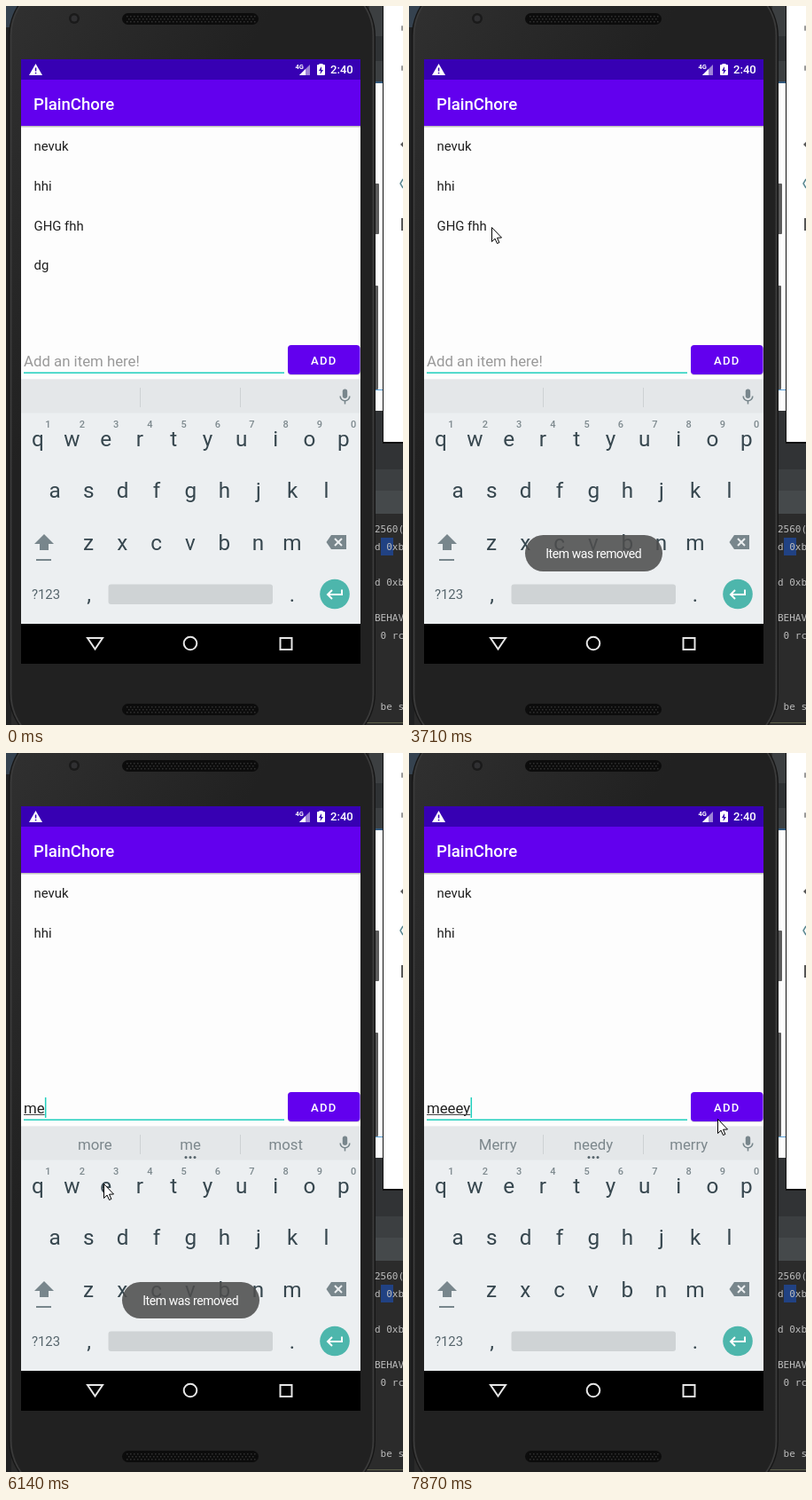
An HTML page with a canvas that plays this animation: 448x810 px, repeating every 7990 ms.

```html
<!DOCTYPE html>
<html lang="en">
<head>
<meta charset="utf-8">
<title>Todo app demo</title>
<style>
html, body { margin: 0; width: 100%; height: 100%; overflow: hidden; background: #2b2b2b; }
canvas { display: block; width: 448px; height: 810px; }
#toast {
  position: absolute; left: 130.5px; top: 595.5px; width: 155.5px; height: 41px;
  border-radius: 20.5px; background: rgba(78, 78, 78, .87); color: #fff; opacity: 0;
  font: 14px/42px Roboto, sans-serif; letter-spacing: -.4px; text-align: center; white-space: nowrap;
}
</style>
</head>
<body>
<canvas id="stage" width="448" height="810"></canvas>
<div id="toast">Item was removed</div>
<script>
const ctx = document.getElementById('stage').getContext('2d');
const toast = document.getElementById('toast');
const LOOP = 7990;
const PURPLE = '#6200ee', DARK_PURPLE = '#3700b3', ACCENT = '#1fcfbd', ICON = '#78868c', KEY = '#37474f';

const items = ['nevuk', 'hhi', 'GHG fhh', 'dg'];
const removals = [2670, 3980];
const word = 'meeey';
const presses = [5270, 6020, 6390, 6680, 7320];
const suggestions = ['', 'more me most', 'me new met', 'me new meet', 'me new meet', 'Merry needy merry'];

// Pointer journeys, each continuing from where the last one ended.
const home = { x: 177, y: 527, end: 250 };
const moves = [
  { start: 300, end: 790, x: 328, y: 597 },
  { start: 930, end: 1190, x: 92, y: 316 },
  { start: 1190, end: 1340, x: 90, y: 300 },
  { start: 1600, end: 1730, x: 87, y: 290 },
  { start: 2850, end: 3190, x: 93, y: 249 },
  { start: 4100, end: 4970, x: 318, y: 603 },
  { start: 5150, end: 5510, x: 110, y: 485 },
  { start: 6530, end: 6680, x: 160, y: 501 },
  { start: 6800, end: 7180, x: 235, y: 499 },
  { start: 7320, end: 7870, x: 348, y: 412 }
];

const clamp = v => Math.max(0, Math.min(1, v));
const ease = v => v * v * (3 - 2 * v);
const passed = (times, t) => times.filter(time => t >= time).length;

function pointerAt(t) {
  let { x, y } = home;
  for (const m of moves) {
    const k = ease(clamp((t - m.start) / (m.end - m.start)));
    x += (m.x - x) * k;
    y += (m.y - y) * k;
  }
  return [Math.round(x), Math.round(y)];
}

function rect(x, y, w, h, color, r = 0) {
  ctx.fillStyle = color;
  ctx.beginPath();
  ctx.roundRect(x, y, w, h, r);
  ctx.fill();
}

function disc(x, y, r, color) {
  rect(x - r, y - r, 2 * r, 2 * r, color, r);
}

function text(str, x, y, size, color, { weight = 400, align = 'left', family = 'Roboto, sans-serif', spacing = 0 } = {}) {
  ctx.font = `${weight} ${size}px ${family}`;
  ctx.textAlign = align;
  ctx.letterSpacing = spacing + 'px';
  ctx.fillStyle = color;
  ctx.fillText(str, x, y);
  ctx.letterSpacing = '0px';
}

function trace(points) {
  ctx.beginPath();
  points.forEach(([x, y]) => ctx.lineTo(x, y));
}

function fillShape(points, color) {
  trace(points);
  ctx.closePath();
  ctx.fillStyle = color;
  ctx.fill();
}

function line(points, color, width, closed = false) {
  trace(points);
  if (closed) ctx.closePath();
  ctx.strokeStyle = color;
  ctx.lineWidth = width;
  ctx.stroke();
}

function drawDesktop() {
  rect(0, 0, 448, 810, '#2b2b2b');
  rect(0, 0, 20, 30, '#35424f');
  rect(0, 24, 6, 786, '#202122');
  rect(410, 0, 15, 85, '#3c3f41');
  rect(410, 34, 15, 28, '#2f3234');
  rect(410, 85, 15, 2, '#31587c');
  rect(410, 87, 15, 369, '#fdfdfd');
  rect(410, 432, 15, 1, '#5aa0d8');
  rect(410, 456, 38, 66, '#313335');
  rect(425, 0, 23, 493, '#111');
  rect(426, 0, 22, 491, '#fff');
  for (const y of [25, 70]) rect(446, y - 3, 2, 6, '#999', 1);
  fillShape([[445, 156], [448, 153], [448, 159]], '#555');
  line([[448, 195], [445, 200], [448, 205]], '#5a8790', 1.5);
  rect(446, 239, 2, 14, '#555');
  rect(410, 522, 38, 24, '#3c3f41');
  rect(410, 546, 38, 26, '#45494b');
  rect(400, 807, 48, 1, '#5d5f4a');
}

function drawLog() {
  rect(423, 599, 14, 20, '#214283');
  const log = ['2560(', 'd 0xb', '', 'd 0xb', '', 'BEHAV', ' 0 rc', '', '', '', ' be s'];
  log.forEach((str, i) =>
    text(str, 416, 593 + i * 20, 11, '#bbb', { family: '"DejaVu Sans Mono", monospace' }));
}

function drawGrill(y) {
  rect(131, y, 154, 13, '#0c0c0c', 6.5);
  for (let row = 0; row < 3; row++)
    for (let x = 136 + row % 2 * 2; x < 281; x += 4) rect(x, y + 3 + row * 3, 1.5, 1.5, '#303030');
}

function drawPhone() {
  rect(415, 200, 6, 57, '#5c5c5c', 1);
  rect(415, 315, 5, 117, '#5c5c5c', 1);
  const shine = ctx.createLinearGradient(0, 0, 230, 130);
  shine.addColorStop(0, '#303030');
  shine.addColorStop(1, '#212121');
  rect(3, -30, 414, 868, '#161616', 64);
  rect(4.5, -28.5, 411, 865, '#3a3a3a', 62);
  rect(6.5, -27, 407, 862, shine, 60);
  disc(77, 14, 6, '#1a1a1a');
  disc(77, 14, 3.5, '#303032');
  drawGrill(8);
  drawGrill(786);
}

function drawAppBar() {
  rect(17, 60, 383, 23, DARK_PURPLE);
  rect(17, 83, 383, 52, PURPLE);
  rect(17, 135, 383, 286, '#fdfdfd');
  rect(17, 135, 383, 1, '#bdbdbd');
  rect(17, 136, 383, 1, '#dedede');
  fillShape([[33.5, 65], [41, 78], [26, 78]], '#fff');
  rect(32.8, 69.5, 1.5, 4, DARK_PURPLE);
  rect(32.8, 74.8, 1.5, 1.5, DARK_PURPLE);
  fillShape([[343, 66], [343, 78], [331, 78]], '#9d83d8');
  fillShape([[338, 71], [338, 78], [331, 78]], '#fff');
  text('4G', 326.5, 71, 7.5, '#fff', { weight: 700 });
  rect(351, 66, 9, 12, '#fff', 1);
  rect(353.5, 65, 4, 2, '#fff');
  fillShape([[356, 68], [353, 73], [355, 73], [354.5, 77], [358, 72], [356, 72]], DARK_PURPLE);
  text('2:40', 366, 76, 13.1, '#fff', { weight: 500 });
  text('PlainChore', 31, 116.5, 18.6, '#fff', { weight: 500 });
}

function drawForm(t) {
  const left = items.slice(0, items.length - passed(removals, t));
  left.forEach((item, i) => text(item, 31.5, Math.round(163 + i * 44.8), 14.9, '#1f1f1f'));

  const value = word.slice(0, passed(presses, t));
  text(value || 'Add an item here!', 20, 406, 16.8, value ? '#222' : '#999');
  const width = value ? ctx.measureText(value).width : 0;
  rect(20, 407, width, 1, '#444');
  rect(20, 412.5, 294, 1.5, ACCENT);
  const blinkOn = t > 375 && (t - 375) % 960 < 450;
  if (value || blinkOn) rect(20.3 + width, 388, 1.5, 23, ACCENT);

  rect(318, 383, 82, 33, '#d5d2dc', 4);
  rect(318, 382, 81.5, 33, PURPLE, 4);
  text('ADD', 344, 404, 13.1, '#fff', { weight: 500, spacing: 1.2 });
}

function drawMic() {
  rect(379.8, 431.5, 5.4, 10.5, ICON, 2.7);
  ctx.beginPath();
  ctx.arc(382.5, 439.5, 5.3, 0, Math.PI);
  ctx.strokeStyle = ICON;
  ctx.lineWidth = 1.6;
  ctx.stroke();
  rect(381.7, 444.5, 1.6, 4, ICON);
}

function drawSuggestions(t) {
  rect(17, 421, 383, 37.5, '#e4e7e9');
  for (const x of [151, 264]) rect(x, 430, 1, 22, '#cdd1d3');
  const words = suggestions[passed(presses, t - 200)];
  if (words) {
    words.split(' ').forEach((w, i) => text(w, 100.3 + i * 107.7, 447, 16.8, '#7c878c', { align: 'center' }));
    for (const x of [203, 208, 213]) disc(x, 455.5, 1.5, '#56646b');
  }
  drawMic();
}

function drawKeyboard() {
  const pitch = 38.3, centered = { align: 'center' };
  rect(17, 420, 383, 276, '#eceff1');
  const rows = [['qwertyuiop', 36, 496], ['asdfghjkl', 55, 554], ['zxcvbnm', 93, 613]];
  for (const [letters, x, y] of rows)
    [...letters].forEach((c, i) => text(c, x + i * pitch, y, 24.3, KEY, centered));
  [...'1234567890'].forEach((c, i) =>
    text(c, 47.5 + i * pitch, 475, 11, '#7d898e', { weight: 500, align: 'center' }));

  fillShape([[43, 595], [54, 606], [32, 606]], ICON);
  rect(38, 605, 10, 8, ICON);
  rect(34, 623, 17, 2, ICON);
  fillShape([[361.5, 604], [367, 596], [384, 596], [384, 612], [367, 612]], ICON);
  line([[371, 600], [379, 608]], '#eceff1', 2);
  line([[379, 600], [371, 608]], '#eceff1', 2);

  text('?123', 45, 668, 14.9, '#56656c', centered);
  text(',', 93.5, 671, 24, KEY, centered);
  text('.', 323, 671, 24, KEY, centered);
  rect(115.5, 651.5, 185.5, 22.5, '#cfd3d5', 3);
  disc(371, 662.5, 16.8, '#4db6ac');
  line([[379, 657.5], [379, 663], [363.5, 663]], '#fff', 2);
  line([[368, 658], [363, 663], [368, 668]], '#fff', 2);
}

function drawNavBar() {
  rect(17, 696, 383, 45, '#000');
  line([[92, 712], [109, 712], [100.5, 724.5]], '#e6e6e6', 2, true);
  ctx.beginPath();
  ctx.arc(208, 718, 7.3, 0, 7);
  ctx.stroke();
  ctx.strokeRect(309.5, 712, 13, 13);
}

function drawPointer([x, y]) {
  const arrow = [[0, 0], [0, 16], [3.6, 12.6], [6, 18], [8.4, 17], [6, 11.7], [11, 11.5]]
    .map(([dx, dy]) => [x + .5 + dx, y + .5 + dy]);
  fillShape(arrow, '#fff');
  line(arrow, '#000', 1, true);
}

function draw(t) {
  drawDesktop();
  drawPhone();
  drawLog();
  drawAppBar();
  drawForm(t);
  drawKeyboard();
  drawSuggestions(t);
  drawNavBar();
  if (t >= home.end) drawPointer(pointerAt(t));
  toast.style.opacity = Math.min(clamp((t - 2600) / 330), clamp((6820 - t) / 330));
}

const start = performance.now();
function tick() {
  draw((performance.now() - start) % LOOP);
  requestAnimationFrame(tick);
}
tick();
</script>
</body>
</html>
```
